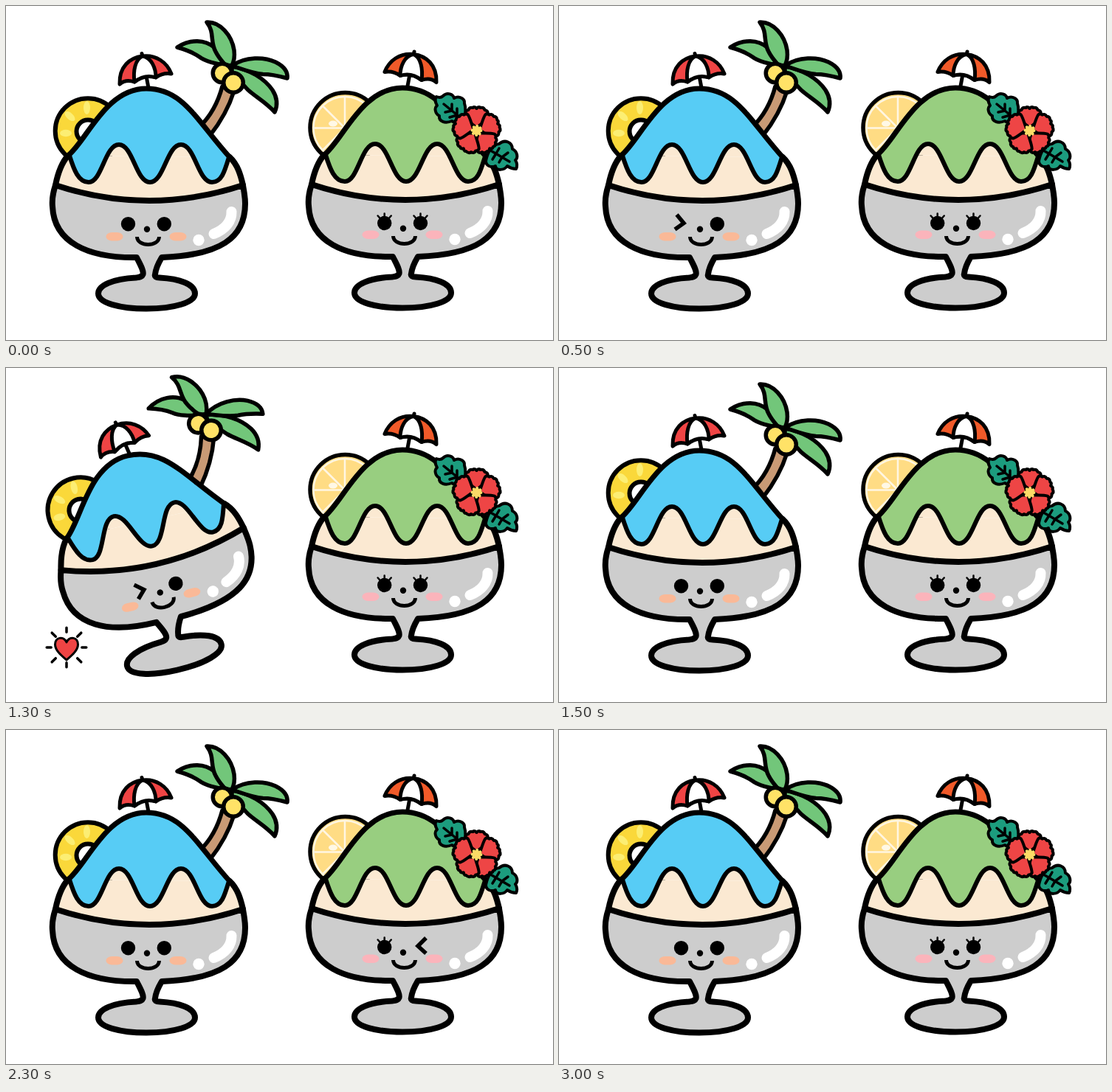
These frames come from a looping animation (741 px wide and 453 px high, 3500 ms). An HTML page:

```html
<!DOCTYPE html>
<html lang="en">
<head>
<meta charset="utf-8">
<title>Shaved ice friends</title>
<style>
  html, body { margin: 0; width: 100%; height: 100%; overflow: hidden; background: #fff; }
  svg { display: block; }
  .ink { stroke: #000; stroke-linecap: round; stroke-linejoin: round; }
  .line { fill: none; }
</style>
</head>
<body>
<svg width="741" height="453" viewBox="0 0 741 453">
  <defs>
    <path id="hill" d="M84 203C110 182 135 112 190 112C240 112 258 155 303 205"/>
    <g id="cup" class="ink" stroke-width="8">
      <use href="#hill" fill="#fbe9d2" stroke="none"/>
      <path fill="#fbe9d2" stroke="none" d="M84 203C74 214 70 228 67 243Q194 285 321 243C318 230 314 215 303 205Z"/>
      <path class="line" d="M84 203C74 214 70 228 67 243M321 243C318 230 314 215 303 205"/>
      <path fill="#cdcdcd" d="M67 243C63 255 62 262 63 272C65 320 110 342 177 341C181 349 187 359 185.500 364C184 368 180 368 176 368.500C145 370 125 379 125 390C125 403 155 410.500 190 410.500C228 410.500 256 402 256 390C256 377 235 370 208 368.500C203 368.500 201 367 202 364C203 355 208 346 211 341C290 338 324 315 324 268C324 258 322 250 321 243Q194 285 67 243Z"/>
      <path fill="var(--syrup)" stroke="none" d="M84 203C110 182 135 112 190 112C240 112 258 155 303 205C296 225 292 239 279 239C260 239 256 188 237 188C218 188 214 239 195 239C176 239 172 188 153 188C134 188 130 239 112 239C98 239 92 222 86 203Z"/>
      <path class="line" stroke-width="6" d="M86 203C92 222 98 239 112 239C130 239 134 188 153 188C172 188 176 239 195 239C214 239 218 188 237 188C256 188 260 239 279 239C292 239 296 225 302 205"/>
      <use href="#hill" class="line" stroke-width="7"/>
      <path class="line" stroke-width="14" style="stroke:#fff" d="M305.500 279C306 292 297 303 281.500 309"/>
      <circle cx="261" cy="317.500" r="7.700" fill="#fff" stroke="none"/>
      <circle cx="191" cy="302.800" r="4.200" stroke="none"/>
      <path class="line" stroke-width="5" style="stroke-linecap:butt" d="M177.500 313C178 327 207 327 207.500 313"/>
    </g>

    <g id="cheeks">
      <rect x="135.500" y="307" width="23" height="11.500" rx="8" ry="5.700"/>
      <rect x="221.500" y="307" width="23" height="11.500" rx="8" ry="5.700"/>
    </g>

    <g id="umbrella" class="ink" stroke-width="5">
      <path class="line" d="M190 95L193 111M184 64.500L185 69"/>
      <path fill="var(--cloth)" d="M154 106C153 82 168 70 185 68C203 66 218 76 224 92Q213 90 203 97Q188 92 174 103Q162 99 154 106Z"/>
      <path fill="#fff" d="M185 68C175 72 172 88 174 103Q188 92 203 97C203 84 197 70 185 68Z"/>
    </g>

    <g id="lashEye">
      <circle r="9.700"/>
      <path class="ink line" stroke-width="2.500" d="M0-13V-7M-9-10L-5.500-6M9-10L5.500-6"/>
    </g>

    <g id="heart" class="ink">
      <path fill="#ef4444" stroke-width="3" d="M0 17C-7 11-15.500 4-15.500-4C-15.500-14-4-16 0-7C4-16 15.500-14 15.500-4C15.500 4 7 11 0 17Z"/>
      <path id="rays" class="line" stroke-width="3.500"/>
    </g>

    <path id="petal" d="M4 0C10-7 13-13 18-17Q21-18 23-15Q27-16 28-11Q32-10 31-5Q33-3 30 0Q33 3 31 5Q32 10 28 11Q27 16 23 15Q21 18 18 17C13 13 10 7 4 0Z"/>
  </defs>

  <g id="left" style="--syrup:#57ccf5;--cloth:#ef4444">
    <g class="ink" stroke-width="6">
      <circle cx="111" cy="169.500" r="44.300" fill="#fad83a"/>
      <circle cx="111" cy="170" r="15.500" fill="#fff"/>
    </g>
    <g fill="#fcee73">
      <ellipse cx="109.500" cy="138" rx="4.500" ry="9"/>
      <ellipse cx="86.500" cy="149.500" rx="8.500" ry="4.500" transform="rotate(42 86.500 149.500)"/>
      <ellipse cx="81" cy="172.500" rx="8" ry="4.700"/>
    </g>
    <g class="ink" stroke-width="5.500" fill="#72c67a">
      <path fill="#c99a75" d="M262 164Q284 143 293 109L309 115Q299 147 276 176Z"/>
      <path d="M232 56C250 44 270 46 282 56C290 63 294 70 297 80C285 79 270 75 262 69C252 62 243 59 232 56Z"/>
      <path d="M272 22C290 21 306 40 309 60C310 68 309 75 306 81L297 80C292 74 288 70 284 62C276 48 283 36 272 22Z"/>
      <path d="M306 82C330 86 350 98 361 114C368 125 368 135 364 144C354 132 338 123 328 114C321 107 314 98 306 90Z"/>
      <path d="M306 81C325 68 350 69 365 76C377 82 382 90 381 98C370 95 360 92.500 348 92.500C332 91 322 86 306 81Z"/>
      <circle cx="293" cy="91" r="12.800" fill="#ffe267"/>
      <circle cx="308" cy="104" r="13.300" fill="#ffe267"/>
    </g>
    <use href="#umbrella"/>
    <use href="#cup"/>
    <use href="#cheeks" fill="#fab997"/>
    <circle cx="214.300" cy="295.700" r="9.700"/>
    <circle id="leftOpen" cx="165.500" cy="295.700" r="9.700"/>
    <path id="leftWink" class="line" stroke="#000" stroke-width="5.500" d="M159.500 283L169 294.500L157 303"/>
  </g>

  <g id="right" style="--syrup:#98ce80;--cloth:#f15a29">
    <circle class="ink" cx="459.500" cy="165" r="47.500" fill="#ffdc84" stroke-width="5.500"/>
    <g class="line" stroke="#fff6e2" stroke-width="2.500">
      <circle cx="459" cy="165.500" r="42.500"/>
      <path d="M459 123V208M417 165.500H501M429 135.500L489 195.500M489 135.500L429 195.500"/>
    </g>
    <ellipse cx="443" cy="159.500" rx="6" ry="4" fill="#fff8e6"/>
    <use href="#umbrella" transform="translate(737 -2.500) scale(-1 1)"/>
    <use href="#cup" transform="translate(347 -1)"/>
    <use href="#cheeks" transform="translate(347 -2.500)" fill="#fbb4bb"/>
    <use href="#lashEye" x="512.700" y="294.500"/>
    <use id="rightOpen" href="#lashEye" x="561.500" y="294.500"/>
    <path id="rightWink" class="line" stroke="#000" stroke-width="5.500" d="M569 282L558 293L569 303"/>
    <g class="ink" stroke-width="4" fill="#1c9c7e">
      <path d="M620 158C612 160 606 158 604 156C594 160 586 156 587 149C581 146 580 138 584 135C581 130 581 126 583 123C588 125 590 124 592 122C598 116 606 120 607 125C614 121 622 126 621 132C624 140 622 150 620 158Z"/>
      <path d="M650 210C653 196 658 188 668 187C676 180 686 185 686 194C693 197 694 206 690 209C693 214 692 219 691 221C686 221 682 219 679 217C675 223 664 224 663 217C656 220 650 216 650 210Z"/>
      <path class="line" stroke-width="3.500" d="M593 133L620 155M604 142V133M604 142L595 144M611 148V139M611 148L601 151M653 194L682 211M664 200L668 193M664 200L659 208M672 205L680 199M672 205L668 212"/>
    </g>
    <g transform="translate(637.500 169)">
      <g id="petals" class="ink" stroke-width="4" fill="#ee4545"></g>
      <circle r="6" fill="#fbdb67" stroke="#fbdb67" stroke-width="4" stroke-linecap="round" stroke-dasharray="0.100 4.612"/>
    </g>
  </g>

  <use id="leftHeart" href="#heart" transform="translate(82 379)"/>
  <use id="rightHeart" href="#heart" transform="translate(676 88.700) scale(1.170)"/>
</svg>
<script>
  const BEAT = 500, BEATS = 7;
  const el = id => document.getElementById(id);
  const show = (id, on) => el(id).setAttribute("visibility", on ? "visible" : "hidden");
  const move = (id, on, how) => el(id).setAttribute("transform", on ? how : "");

  el("petals").innerHTML = [-90, -18, 54, 126, 198]
    .map(a => `<use href="#petal" transform="rotate(${a})"/>`).join("");

  el("rays").setAttribute("d", Array.from({ length: 8 }, (_, i) => {
    const a = i * Math.PI / 4;
    const at = r => `${(r * Math.cos(a)).toFixed(2)} ${(r * Math.sin(a)).toFixed(2)}`;
    return `M${at(20.800)}L${at(i % 2 ? 28 : 26.800)}`;
  }).join(""));

  // Each friend winks for one beat, then leans with a heart for the next.
  function draw(ms) {
    const beat = Math.floor(ms / BEAT) % BEATS;
    const winkL = beat === 1 || beat === 2, leanL = beat === 2;
    const winkR = beat === 4 || beat === 5, leanR = beat === 5;
    show("leftOpen", !winkL);
    show("leftWink", winkL);
    show("leftHeart", leanL);
    show("rightOpen", !winkR);
    show("rightWink", winkR);
    show("rightHeart", leanR);
    move("left", leanL, "translate(252 305) rotate(-13) translate(-233 -313)");
    move("right", leanR, "translate(521.300 291.400) rotate(15) translate(-538 -301)");
    // The closed eye leans a little further than the head.
    move("leftWink", leanL, "translate(1.500 0.500) rotate(-11 165 294)");
    move("rightWink", leanR, "translate(-1 0.500) rotate(9 563 293)");
  }

  const start = performance.now();
  function tick() {
    draw(performance.now() - start);
    requestAnimationFrame(tick);
  }
  tick();
</script>
</body>
</html>
```
